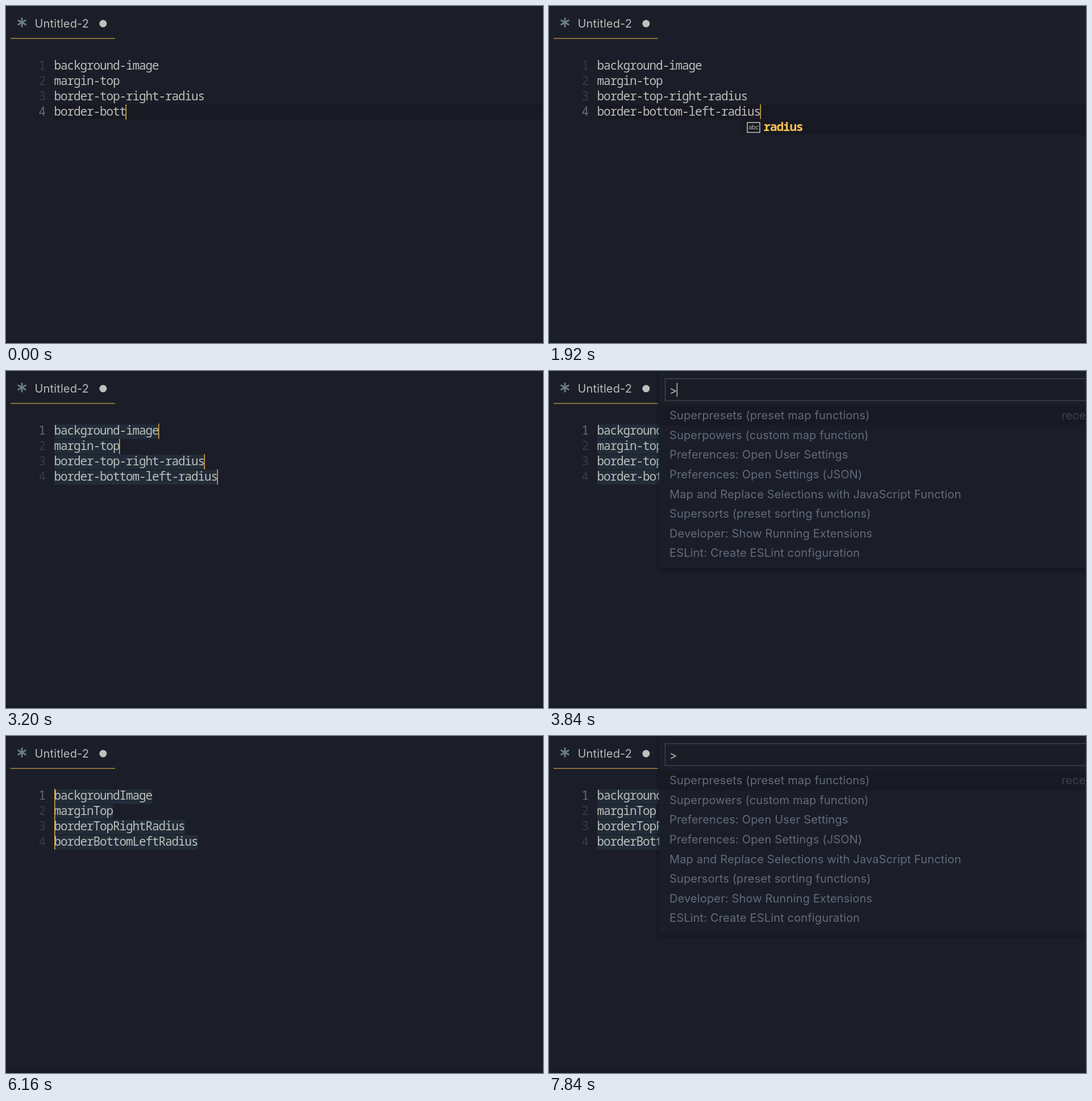
An HTML page that plays this animation: 945x593 px, repeating every 8000 ms.

```html
<!DOCTYPE html>
<html lang="en">
<head>
<meta charset="utf-8">
<title>Editor</title>
<style>
html, body { margin: 0; width: 100%; height: 100%; overflow: hidden; background: #1b1e28; }
svg { display: block; width: 945px; height: 593px; }
text { white-space: pre; }
.code {
  font: 300 21px "Noto Sans Mono", "DejaVu Sans Mono", monospace;
  font-stretch: 80%;
  letter-spacing: calc(11.5px - 1ch);
  fill: #bcbdb8;
}
.ui { font: 20px Inter, "Open Sans", sans-serif; letter-spacing: .15px; fill: #626a7c; }
.num { fill: #363b47; }
.num.active { fill: #666d79; }
.match { font-weight: 700; fill: #fdc550; }
.tab { fill: #b9bbb8; }
.prompt { fill: #bcbdb8; }
.hint { fill: #3c414e; }
.abc { font: 11px "Noto Sans Mono", monospace; letter-spacing: -.6px; fill: #b8b9b4; }
</style>
</head>
<body>
<svg viewBox="0 0 945 593">
  <defs>
    <filter id="blur" x="-5%" y="-10%" width="110%" height="120%"><feGaussianBlur stdDeviation="3.5"/></filter>
  </defs>
  <rect width="945" height="593" fill="#1b1e28"/>
  <rect y="589" width="945" height="4" fill="#171923"/>
  <g stroke="#6a7f8b" stroke-width="2.8">
    <path id="arm" d="M28 20.5V37.5"/>
    <use href="#arm" transform="rotate(60 28 29)"/>
    <use href="#arm" transform="rotate(120 28 29)"/>
  </g>
  <text class="ui tab" x="50.5" y="38">Untitled-2</text>
  <circle cx="170.8" cy="31" r="6.5" fill="#bfc0bd"/>
  <rect x="8" y="56.4" width="184" height="1.4" fill="#b98f3c"/>
  <g id="editor"></g>
  <g id="palette"></g>
</svg>
<script>
const LOOP = 8000, LEFT = 85, CHAR = 11.5, TOP = 92.6, LINE = 26.85, ROW = 34.6;
const SELECT = 2160, SPLIT = 2960, OPEN = 3760, PRESETS = 4640, CONVERT = 6160, REOPEN = 7520;
const KEYS = [80, 240, 320, 480, 560, 640, 800, 880, 1040, 1120, 1200, 1360, 1440, 1600];
const SUGGEST_AT = KEYS[10];

const kebab = ["background-image", "margin-top", "border-top-right-radius", "border-bottom-left-radius"];
const camel = kebab.map(s => s.replace(/-(.)/g, (_, c) => c.toUpperCase()));
const commands = [
  "Superpresets (preset map functions)", "Superpowers (custom map function)",
  "Preferences: Open User Settings", "Preferences: Open Settings (JSON)",
  "Map and Replace Selections with JavaScript Function", "Supersorts (preset sorting functions)",
  "Developer: Show Running Extensions", "ESLint: Create ESLint configuration"
];
const presets = [
  "append difference between times", "convert UPPERCASE", "convert lowercase",
  "convert camelCase", "insert current time (rounded)", "prefix index"
];

const editor = document.getElementById("editor");
const palette = document.getElementById("palette");
const text = (cls, x, y, s) => `<text class="${cls}" x="${x}" y="${y}">${s}</text>`;
const rect = (x, y, w, h, fill, extra = "") =>
  `<rect x="${x}" y="${y}" width="${w}" height="${h}" fill="${fill}" ${extra}/>`;
const lineTop = i => TOP + i * LINE;
const countUntil = (times, t) => times.filter(k => k <= t).length;

// Smooth blink: fade out, stay hidden, fade in, stay visible, once a second.
function blink(t, fadeStart) {
  if (t < fadeStart) return 1;
  const p = (t - fadeStart) % 1000;
  const ease = k => k * k * (3 - 2 * k);
  if (p < 200) return 1 - ease(p / 200);
  if (p < 600) return 0;
  return p < 800 ? ease((p - 600) / 200) : 1;
}

function caret(column, line, opacity) {
  const x = LEFT + column * CHAR - (column ? 1 : 0);
  return rect(x, lineTop(line), 1.5, LINE, "#e0ad48", `opacity="${opacity}"`);
}

function selection(length, line, split) {
  const inset = split ? 1.3 : 0;
  const newline = !split && line < 3 ? 1 : 0;
  const w = (length + newline) * CHAR, r = 4;
  const y = lineTop(line) + inset, h = LINE - inset;
  return `<path fill="#222c39" d="M${LEFT} ${y}h${w - r}q${r} 0 ${r} ${r}v${h - 2 * r}q0 ${r} ${-r} ${r}h${r - w}z"/>`;
}

function suggestion(matched) {
  const word = "radius";
  return rect(338, 199.5, 610, 26, "#181a23", 'stroke="#161822"') +
    rect(349, 205, 22, 17.5, "none", 'stroke="#b8b9b4" stroke-width="1.6"') +
    text("abc", 351, 217, "abc") +
    text("code", 377.5, 219.6, `<tspan class="match">${word.slice(0, matched)}</tspan>${word.slice(matched)}`);
}

function drawEditor(t, paletteOpen) {
  const typed = 11 + countUntil(KEYS, t);
  const lines = t >= CONVERT ? camel : [...kebab.slice(0, 3), kebab[3].slice(0, typed)];
  const selected = t >= SELECT, split = t >= SPLIT;
  const active = split ? 0 : 3;
  let out = selected ? "" : rect(LEFT, lineTop(3), 860, LINE - .6, "#181923");
  lines.forEach((s, i) => {
    if (selected) out += selection(s.length, i, split);
    const y = lineTop(i) + 19.6;
    out += text("code num" + (i === active ? " active" : ""), 57.5, y, i + 1) + text("code", LEFT - .5, y, s);
  });
  if (!paletteOpen) {
    const fadeStart = t >= CONVERT ? 6480 : split ? 3200 : 2440;
    const opacity = blink(t, fadeStart);
    lines.forEach((s, i) => {
      if (split || i === 3) out += caret(t >= CONVERT ? 0 : s.length, i, opacity);
    });
  }
  if (t >= SUGGEST_AT && !selected) out += suggestion(typed - 19);
  editor.innerHTML = out;
}

function drawPalette(items, shift, chosen, prompt, caretOn) {
  const bottom = 70 + shift + items.length * ROW;
  let out = rect(194, 0, 760, bottom + 3, "#11131b", 'filter="url(#blur)" opacity=".85"') +
    rect(194, 0, 751, bottom, "#1b1e28") +
    rect(204.5, 13.5, 750, 38.5 + shift, "#1a1c26", 'stroke="#414854" stroke-width="1.3"') +
    rect(194, 61 + shift + chosen * ROW, 751, ROW, "#181a23");
  items.forEach((s, i) => out += text("ui", 212, 85.2 + shift + i * ROW, s));
  if (prompt) out += text("ui prompt", 212, 41, "&gt;") + text("ui hint", 902, 85.2, "recently used");
  if (caretOn) out += rect(prompt ? 224.6 : 211.6, 21, 1.5, 24, "#bcbdb8");
  palette.innerHTML = out;
}

function draw(t) {
  const inPresets = t >= PRESETS && t < CONVERT;
  const inCommands = t >= OPEN && t < PRESETS || t >= REOPEN;
  drawEditor(t, inPresets || inCommands);
  if (inPresets) {
    const caretOn = countUntil([5080, 5480, 5880], t) % 2 === 0;
    drawPalette(presets, .8, countUntil([5360, 5520, 5680], t), false, caretOn);
  } else if (inCommands) {
    const opened = t >= REOPEN ? REOPEN : OPEN;
    drawPalette(commands, 0, 0, true, t - opened < 320);
  } else {
    palette.innerHTML = "";
  }
}

let start;
function frame(now) {
  start ??= now;
  draw((now - start) % LOOP);
  requestAnimationFrame(frame);
}
draw(0);
requestAnimationFrame(frame);
</script>
</body>
</html>
```
